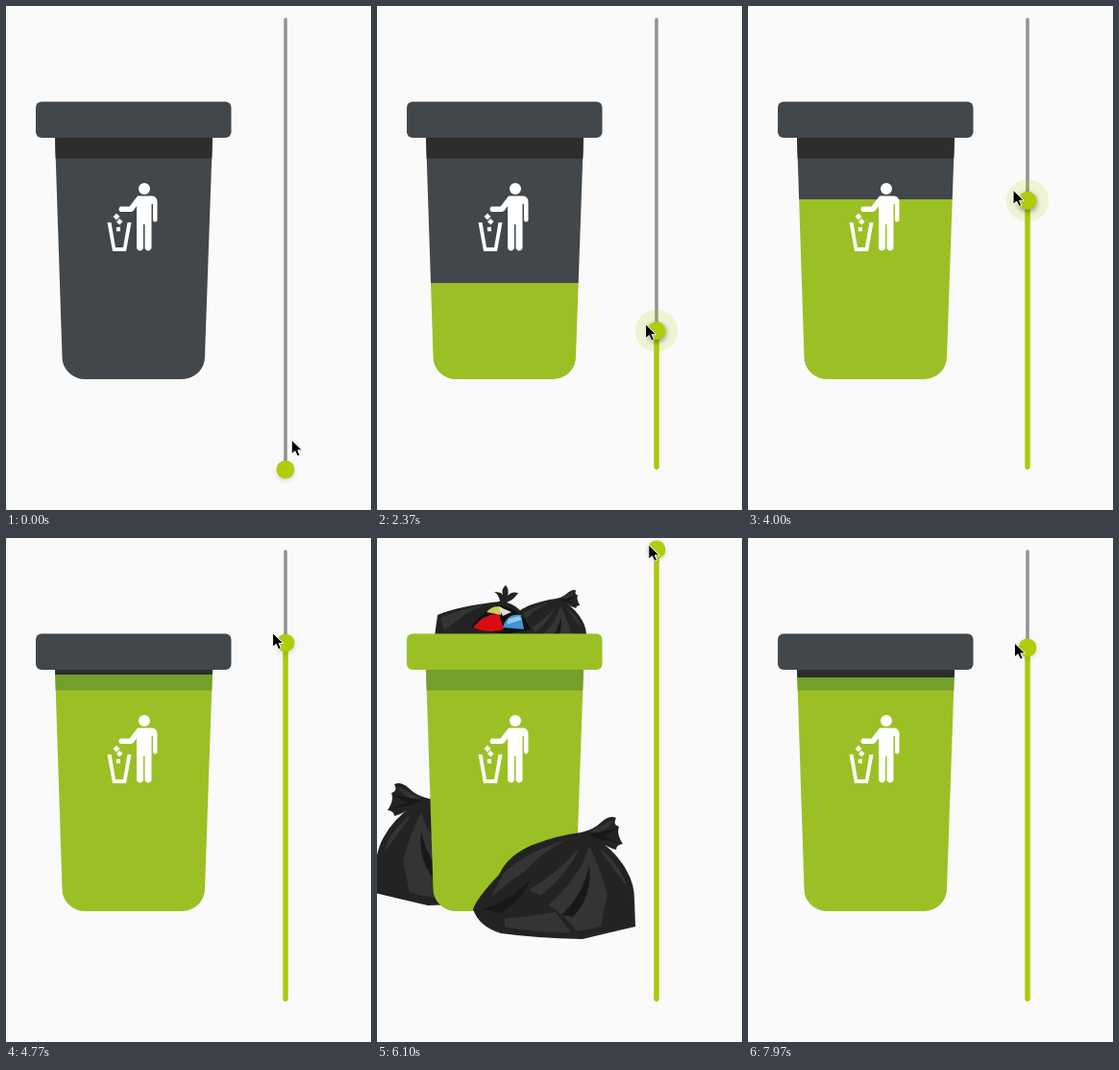
Recreate the animation shown at these times as an HTML page. Size 380 by 524 pixels, loop 8000 ms.

```html
<!DOCTYPE html>
<html lang="en">
<head>
<meta charset="utf-8">
<title>Bin level slider</title>
<style>
  html, body { margin: 0; width: 100%; height: 100%; overflow: hidden; background: #fafafa; }
  svg { display: block; width: 380px; height: 524px; }
</style>
</head>
<body>
<svg viewBox="0 0 380 524">
  <defs>
    <!-- Hard-edged fills: empty colour above the level, full colour below -->
    <linearGradient id="paint" gradientUnits="userSpaceOnUse" x1="0" y1="0" x2="0" y2="524">
      <stop class="level" stop-color="#41474a"/><stop class="level" stop-color="#9bc026"/>
    </linearGradient>
    <linearGradient id="shadePaint" gradientUnits="userSpaceOnUse" x1="0" y1="0" x2="0" y2="524">
      <stop class="level" stop-color="#2d2d2d"/><stop class="level" stop-color="#739f2b"/>
    </linearGradient>
    <filter id="blur" x="-50%" y="-50%" width="200%" height="200%"><feGaussianBlur stdDeviation="2.5"/></filter>

    <g id="bag">
      <path fill="#232323" d="M100 386Q104 374 127 350Q136 330 162 319Q188 309 213 306Q226 303 234 295Q242 288 249 291Q245 298 252 300Q249 308 256 318Q249 319 249 324Q240 322 230 314Q249 326 260 346Q268 360 268 376L269 404Q240 411 214 417Q165 416 129 411Q106 404 100 386Z"/>
      <path fill="#343432" d="M131 350Q150 328 199 313Q168 329 154 347Q137 357 118 374ZM158 366Q186 350 212 321Q196 352 170 372ZM178 382Q212 352 221 320Q232 342 240 370L233 404 208 409Q196 392 178 382ZM133 396Q160 393 186 389L202 410Q160 410 133 404ZM230 322Q252 336 260 362Q246 344 230 322ZM222 305L246 293Q242 302 230 307Z"/>
      <path fill="#181818" d="M110 386Q142 376 160 354Q154 374 128 390ZM192 392Q215 370 221 340Q225 372 204 394ZM220 308L250 302 236 310 253 317 232 313Z"/>
    </g>
  </defs>

  <use id="leftBag" href="#bag" transform="translate(267 -35) scale(-1 1)"/>

  <g id="topBag">
    <use href="#bag" transform="translate(66.600 -110) scale(.565)"/>
    <path fill="#232323" d="M60 102L63 80Q84 71 128 66Q127 59 122 56Q129 56 131 59Q129 53 134 49Q138 54 136 60Q140 55 147 57Q143 64 135 67Q152 71 166 102Z"/>
    <path fill="#343432" d="M66 83Q85 74 110 70Q92 78 70 96Z"/>
    <path fill="#101010" d="M98 93Q116 70 128 70Q150 74 160 95L134 100Z"/>
    <path fill="#d80d13" d="M100 93Q112 78 127 79L132 95Q118 100 100 93Z"/>
    <path fill="#d1ca55" d="M114 77Q121 69 130 72L129 80Z"/>
    <path fill="#d5dfd5" d="M126 71L140 77 131 81Z"/>
    <path fill="#4394d4" d="M131 93Q135 78 150 80L153 95Z"/>
    <path fill="#8ec9ed" d="M137 84L148 81 151 85 135 90Z"/>
  </g>

  <path fill="url(#paint)" d="M51 136H215L207 365A24 23 0 0 1 183 388H83A24 23 0 0 1 58.500 365Z"/>
  <path fill="url(#shadePaint)" d="M51 136H215L214.300 158.500H51.700Z"/>
  <rect fill="url(#paint)" x="31" y="99.500" width="203.500" height="37.500" rx="6"/>

  <g fill="#fff">
    <circle cx="144" cy="190" r="6"/>
    <path d="M137 197.500H152Q157.500 198 157.500 204V223Q155 226 153 223V206H151.500V252Q148 257 144.500 252V227H143V252Q139.500 257 136 252V208L132.500 213 130 214H119Q116 211 119 208.500H128.500Z"/>
    <path d="M115 215.500L118.500 219 115 222.500 111.500 219ZM118 221L121.500 224 118.500 227.500 115 224.500ZM114.800 230L119 229.800V234.200H115Z"/>
    <path d="M105.500 225H109.500L114 251H122L126.500 225H130.500L125 255H111Z"/>
  </g>

  <use id="frontBag" href="#bag"/>

  <g stroke-linecap="round">
    <path d="M291 14V480" stroke="#939393" stroke-width="3.600"/>
    <path id="trackFill" stroke="#abc80d" stroke-width="5.500"/>
  </g>
  <g id="thumb" fill="#b0cc0a">
    <circle id="halo"/>
    <circle id="shade" cy="2" r="10" fill="#000" filter="url(#blur)"/>
    <circle r="9.400"/>
  </g>
  <path id="cursor" d="M0 0V15L3.600 11.800 6.200 17.200 8.800 16.100 6.500 10.900H11.200Z" stroke="#fff" stroke-linejoin="round"/>
</svg>
<script>
  const LOOP = 8000, BOTTOM = 482;

  // Drags: start, end, thumb y reached, easing power (below 1 speeds up, above 1 slows down)
  const drags = [
    [230, 1530, 423, 0.55], [1930, 2500, 333, 2], [2830, 3370, 239, 1], [3370, 3640, 268, 1],
    [3670, 4370, 129, 1], [4670, 5230, 41, 1.28], [5570, 6080, 12, 1],
    [6430, 7230, 354, 1], [7270, 7700, 57, 1], [7700, 7970, 114, 1]
  ];
  // Each bag shows while the thumb is above this y
  const bagLimits = { leftBag: 50, frontBag: 36, topBag: 25 };

  const $ = id => document.getElementById(id);
  const set = (el, name, value) => el.setAttribute(name, value);
  const ramp = (t, start, end) => Math.max(0, Math.min(1, (t - start) / (end - start)));
  const levelStops = document.querySelectorAll('.level');

  const thumbY = t => drags.reduce((y, [start, end, to, power]) =>
    y + (to - y) * (1 - (1 - ramp(t, start, end)) ** power), BOTTOM);

  function draw(t) {
    const y = thumbY(t);
    const level = 71.4 + 0.643 * y + 0.22 * Math.max(0, y - 452);
    levelStops.forEach(stop => set(stop, 'offset', level / 524));

    for (const id in bagLimits) $(id).style.display = y < bagLimits[id] ? '' : 'none';

    $('trackFill').style.display = y < BOTTOM ? '' : 'none';
    set($('trackFill'), 'd', `M291 ${Math.min(y, 478)}V479`);

    const grow = ramp(t, 230, 560);
    const active = grow * (1 - ramp(t, 4150, 4330));
    set($('thumb'), 'transform', `translate(291 ${y})`);
    set($('halo'), 'r', 22 * grow);
    set($('halo'), 'opacity', 0.17 * active);
    set($('shade'), 'opacity', 0.12 + 0.25 * active);

    // The pointer runs slightly ahead of the thumb and bows to its left mid-track
    const away = 1 - ramp(t, 30, 70);
    const x = 276 + 12 * ((y - 200) / 250) ** 2 + 6 * away;
    set($('cursor'), 'transform', `translate(${x} ${thumbY(t + 30) - 5 - 26 * away})`);
  }

  function tick() {
    draw(performance.now() % LOOP);
    requestAnimationFrame(tick);
  }
  tick();
</script>
</body>
</html>
```
